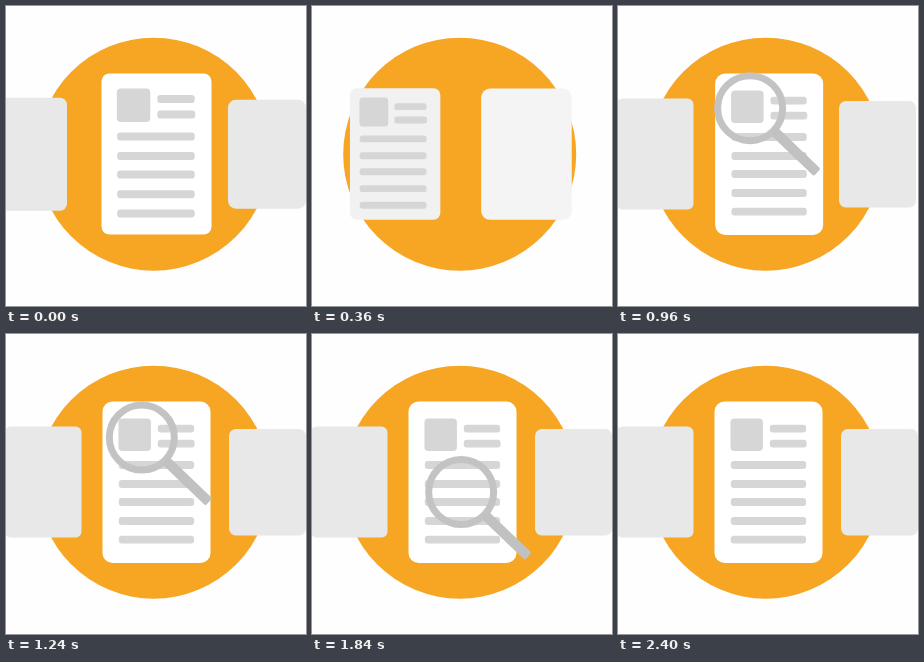
Recreate the animation shown at these times as an HTML page with a canvas. Size 300 px wide and 300 px high, loop 2.92 s.

```html
<!DOCTYPE html>
<html lang="en">
<head>
<meta charset="utf-8">
<title>Document review</title>
<style>
  html, body { margin: 0; width: 100%; height: 100%; overflow: hidden; background: #fff; }
  canvas { display: block; width: 300px; height: 300px; }
</style>
</head>
<body>
<canvas id="stage" width="300" height="300"></canvas>
<script>
const ctx = document.getElementById('stage').getContext('2d');
const LOOP = 2920, STEP = 40;
const ROWS = [131, 150, 168, 187, 205.7];

const clamp = p => Math.min(1, Math.max(0, p));
const lerp = (a, b, p) => a + (b - a) * p;
const span = (t, from, to) => clamp((t - from) / (to - from));
const easeInOut = p => p < .5 ? 4 * p ** 3 : 1 - 4 * (1 - p) ** 3;
const easeOut = p => 1 - (1 - p) ** 3;
const smooth = p => p * p * (3 - 2 * p);

function box(x, y, w, h, r, color) {
  if (w <= 0 || h <= 0) return;
  ctx.fillStyle = color;
  ctx.beginPath();
  ctx.roundRect(x, y, w, h, Math.min(r, w / 2, h / 2));
  ctx.fill();
}

function card(cx, cy, w, h, r, shade) {
  box(cx - w / 2, cy - h / 2, w, h, r, `rgb(${shade},${shade},${shade})`);
}

// Avatar and text rows, laid out around the page centre.
function content(cx, scale, avatar, short, row) {
  const bar = (x, y, w, grow) => {
    const alpha = ctx.globalAlpha;
    ctx.globalAlpha = alpha * Math.min(1, grow * 1.35);
    box(x, y - 148 - 3.9, w * grow, 7.8, 3, '#d6d6d6');
    ctx.globalAlpha = alpha;
  };
  ctx.save();
  ctx.translate(cx, 148);
  ctx.scale(scale, scale);
  const size = 32.5 * avatar;
  box(-21.8 - size / 2, -47.3 - size / 2, size, size, 4, '#d6d6d6');
  bar(1.3, 94.6, 36.3, short(0));
  bar(1.3, 109.6, 36.8, short(1));
  ROWS.forEach((y, i) => bar(-37.7, y, 75.3, row(i)));
  ctx.restore();
}

function magnifier(x, y) {
  ctx.save();
  ctx.translate(x, y);
  ctx.lineWidth = 7;
  ctx.strokeStyle = '#c3c3c3';
  ctx.beginPath();
  ctx.arc(0, 0, 32.5, 0, Math.PI * 2);
  ctx.stroke();
  ctx.rotate(.765);
  box(33, -5, 60, 10, 2, '#c1c1c1');
  ctx.restore();
}

// Where the glass is: fly in, two curved sweeps down the page, fly out.
function glassPosition(t) {
  if (t < 1140) {
    const p = easeOut(span(t, 740, 980));
    return [lerp(345, 132, p), lerp(328, 102, p)];
  }
  if (t < 1680) {
    const p = easeInOut(span(t, 1140, 1640));
    return [132 + .5 * p + 38 * Math.sin(Math.PI * p), lerp(102, 151.3, p)];
  }
  if (t < 2240) {
    const p = easeInOut(span(t, 1680, 2160));
    return [lerp(132.5, 148, p) + 32 * Math.sin(Math.PI * p), lerp(151.3, 197, p)];
  }
  const p = span(t, 2240, 2400) ** 2;
  return [lerp(148, 345, p), lerp(197, 350, p)];
}

function draw(t) {
  ctx.fillStyle = '#fefefe';
  ctx.fillRect(0, 0, 300, 300);
  ctx.fillStyle = '#f6a623';
  ctx.beginPath();
  ctx.arc(147.7, 148.2, 116.5, 0, Math.PI * 2);
  ctx.fill();

  // Old left card leaves
  const leave = span(t, 0, 220) ** 1.6;
  card(lerp(22.5, -44, leave), 148.3, 77, 113, 7, 232);

  // First page shrinks into the left slot
  const out = easeInOut(span(t, 40, 640));
  card(lerp(150.5, 37, out), 148, lerp(110, 77, out), lerp(161, 111, out),
    lerp(8, 6, out), Math.round(lerp(255, 232, out)));
  const fade = 1 - span(t, 360, 560);
  if (fade > 0) {
    ctx.globalAlpha = fade;
    content(lerp(150, 34, out), lerp(1.03, .79, out), 1, () => 1, () => 1);
    ctx.globalAlpha = 1;
  }

  // Right card grows into the centre, overshoots and settles
  const grow = easeInOut(span(t, 80, 680));
  const settle = smooth(span(t, 680, 940));
  const rest = smooth(span(t, 940, 1100));
  const cx = lerp(261, 146.5, grow) + 4.7 * settle - .7 * rest;
  card(cx, 148.2, lerp(78, 109, grow) - settle, lerp(109, 163.5, grow) - 2 * settle,
    lerp(8, 10, grow), Math.round(lerp(232, 255, smooth(span(t, 100, 620)))));
  const pop = 1.17 * easeOut(span(t, 440, 660)) - .17 * smooth(span(t, 680, 860));
  content(cx, 1, pop,
    i => easeOut(span(t, 440 + 40 * i, 660 + 20 * i)),
    i => span(t, 480 + 40 * i, 720 + 40 * i));

  // New right card arrives
  const arrive = easeInOut(span(t, 410, 867));
  card(lerp(343.5, 259.5, arrive) + 2 * smooth(span(t, 960, 1100)), 148.3, 77, 106.5, 7, 232);

  if (t > 740 && t < 2400) magnifier(...glassPosition(t));
}

function frame() {
  const t = performance.now() % LOOP;
  draw(Math.floor(t / STEP) * STEP);
  requestAnimationFrame(frame);
}
frame();
</script>
</body>
</html>
```
